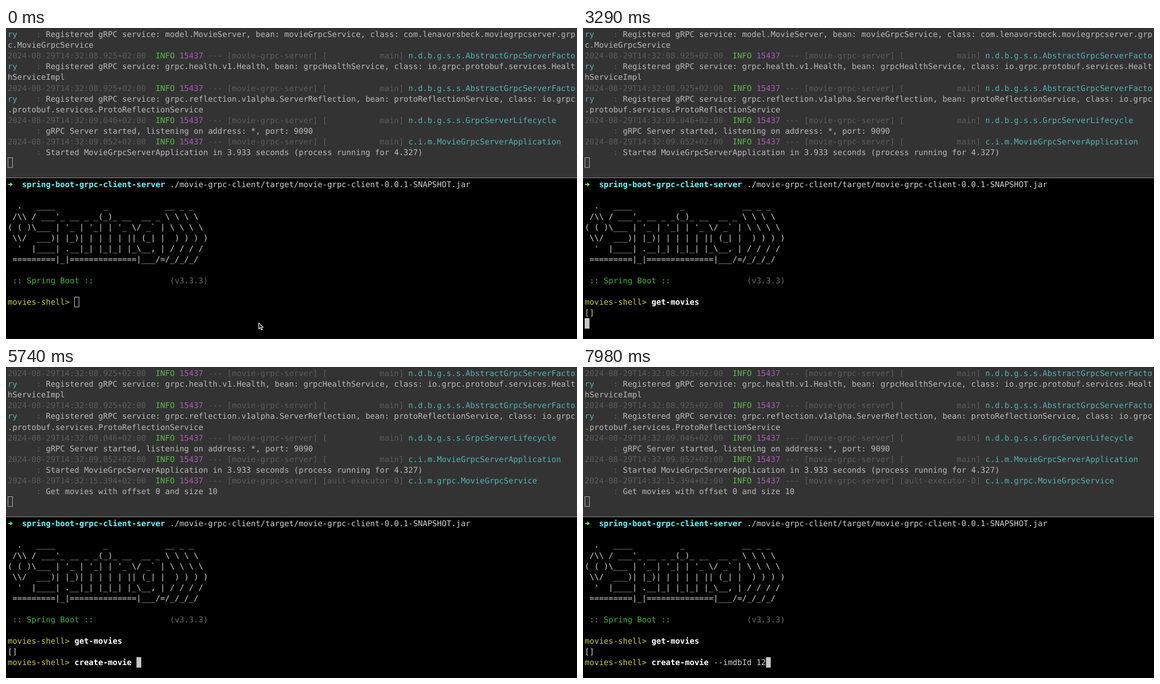
Recreate the animation shown at these times as an HTML page with a canvas. Size 1013 by 553 pixels, loop 8000 ms.

```html
<!DOCTYPE html>
<html lang="en">
<head>
<meta charset="utf-8">
<title>movies-shell</title>
<style>
  html, body { margin: 0; width: 100%; height: 100%; overflow: hidden; background: #000; }
  canvas { display: block; }
</style>
</head>
<body>
<canvas id="term" width="1013" height="553"></canvas>
<script>
const ctx = document.getElementById('term').getContext('2d');
const LOOP = 8000;
const LEFT = 3, CELL = 8.462, LINE = 19.04, BASE = 14.3;
const TOP = 2, BOTTOM = 268.5, SPLIT = 266;
const FONT = '14.055px "DejaVu Sans Mono", monospace';

const C = {
  pane: '#333333', split: '#8c8c8c',
  dim: '#5c5c5c', log: '#bababa', info: '#5fb94c', pid: '#a95fb0', cls: '#55b3b5',
  text: '#d2d2d2', bold: '#ffffff', prompt: '#cbca3e', green: '#3cb53c', faint: '#6a6a6a',
  host: '#66fbfd', arrow: '#5ff468', typed: '#7c4412', cyan: '#22b5b8', cursor: '#c9c9c9'
};

const xAt = col => LEFT + col * CELL;

function put(origin, row, col, str, color, bold) {
  ctx.font = (bold ? 'bold ' : '') + FONT;
  ctx.fillStyle = color;
  const y = origin + row * LINE + BASE;
  for (const ch of str) {
    if (ch !== ' ') ctx.fillText(ch, xAt(col), y);
    col++;
  }
  return col;
}

function block(origin, row, col, cells = 1) {
  ctx.fillStyle = C.cursor;
  ctx.fillRect(xAt(col), origin + row * LINE, cells * CELL, LINE - 0.5);
}

function hollow(origin, row, col, color) {
  ctx.strokeStyle = color;
  ctx.lineWidth = 1;
  ctx.strokeRect(Math.round(xAt(col)) + 0.5, Math.round(origin + row * LINE) + 0.5, 8, 17.5);
}

// Upper pane: each line is a list of [column, text, color]
const head = (time, thread, cls) => [
  [0, `2024-08-29T14:32:${time}+02:00`, C.dim],
  [31, 'INFO', C.info],
  [36, '15437', C.pid],
  [42, `--- [movie-grpc-server] [${thread.padStart(15)}]`, C.dim],
  [84, cls, C.cls]
];
const body = (str, wrap = '') => [[0, wrap, C.cls], [6, ':', C.dim], [8, str, C.log]];
const rest = str => [[0, str, C.log]];
const FACTORY = 'n.d.b.g.s.s.AbstractGrpcServerFacto';

const logs = [
  body('Registered gRPC service: model.MovieServer, bean: movieGrpcService, class: com.lenavorsbeck.moviegrpcserver.grp', 'ry'),
  rest('c.MovieGrpcService'),
  head('08.925', 'main', FACTORY),
  body('Registered gRPC service: grpc.health.v1.Health, bean: grpcHealthService, class: io.grpc.protobuf.services.Healt', 'ry'),
  rest('hServiceImpl'),
  head('08.925', 'main', FACTORY),
  body('Registered gRPC service: grpc.reflection.v1alpha.ServerReflection, bean: protoReflectionService, class: io.grpc', 'ry'),
  rest('.protobuf.services.ProtoReflectionService'),
  head('09.046', 'main', 'n.d.b.g.s.s.GrpcServerLifecycle'),
  body('gRPC Server started, listening on address: *, port: 9090'),
  head('09.052', 'main', 'c.i.m.MovieGrpcServerApplication'),
  body('Started MovieGrpcServerApplication in 3.933 seconds (process running for 4.327)'),
  head('15.394', 'ault-executor-0', 'c.i.m.grpc.MovieGrpcService'),
  body('Get movies with offset 0 and size 10')
];

const banner = String.raw`
  .   ____          _            __ _ _
 /\\ / ___'_ __ _ _(_)_ __  __ _ \ \ \ \
( ( )\___ | '_ | '_| | '_ \/ _${'`'} | \ \ \ \
 \\/  ___)| |_)| | | | | || (_| |  ) ) ) )
  '  |____| .__|_| |_|_| |_\__, | / / / /
 =========|_|==============|___/=/_/_/_/`.split('\n').slice(1);

const options = ['--genre', '--help', '--imdbId', '--title', '--year', '-h'];

// [time, text typed so far]
const first = [[0, ''], [770, 'g'], [910, 'ge'], [1050, 'get'], [1260, 'get-'], [1470, 'get-m'],
  [1680, 'get-mo'], [1890, 'get-mov'], [2100, 'get-movi'], [2380, 'get-movie'], [2520, 'get-movies']];
const second = [[3360, ''], [4480, 'c'], [4690, 'cr'], [4830, 'cre'], [5040, 'create-movie '],
  [6230, 'create-movie -'], [6440, 'create-movie --genre'], [6650, 'create-movie --help'],
  [7000, 'create-movie --imdbId'], [7350, 'create-movie --imdbId '],
  [7840, 'create-movie --imdbId 1'], [7980, 'create-movie --imdbId 12']];
const FOCUS = 210, ENTER = 2660, REPLY = 3290, SCROLL = 3360, MENU = 6230, ACCEPT = 7350;

const current = (keys, t) => keys.reduce((s, [at, str]) => t >= at ? str : s, '');

function promptLine(row, input, command) {
  put(BOTTOM, row, 0, 'movies-shell>', C.prompt);
  if (!input.startsWith(command)) return put(BOTTOM, row, 14, input, C.typed);
  const end = put(BOTTOM, row, 14, command, C.bold, true);
  return put(BOTTOM, row, end, input.slice(command.length), C.text);
}

function drawMenu(input) {
  const chosen = input.split(' ')[1];
  options.forEach((name, i) => {
    const col = i * 11;
    if (name === chosen) {
      block(BOTTOM, 14, col, 8);
      put(BOTTOM, 14, col, name, '#000');
    } else {
      put(BOTTOM, 14, col, '-', C.cyan);
      put(BOTTOM, 14, col + 1, name.slice(1), C.text);
    }
  });
}

function drawPath(points) {
  ctx.beginPath();
  points.forEach(([x, y]) => ctx.lineTo(x, y));
  ctx.closePath();
}

function drawArrow() {
  ctx.fillStyle = C.arrow;
  ctx.fillRect(4, 277.2, 5, 2);
  drawPath([[7.5, 274.6], [12, 278.2], [7.5, 281.8]]);
  ctx.fill();
}

function drawPointer(t) {
  const p = Math.floor(t / 70) / 5;
  if (p >= 1) return;
  ctx.save();
  ctx.translate(448.5 + 6 * p, 524.5 + 34 * p * p);
  drawPath([[0, 0], [0, 10.6], [2.5, 8.4], [4.2, 12.2], [6, 11.4], [4.4, 7.7], [7.6, 7.5]]);
  ctx.fillStyle = '#000';
  ctx.strokeStyle = '#fff';
  ctx.lineWidth = 1.1;
  ctx.fill();
  ctx.stroke();
  ctx.restore();
}

function drawServer(t) {
  ctx.fillStyle = C.pane;
  ctx.fillRect(0, 0, 1013, SPLIT);
  ctx.fillStyle = C.split;
  ctx.fillRect(0, SPLIT, 1013, 1);
  const from = t >= SCROLL ? 2 : 0;
  logs.slice(from, from + 12).forEach((line, row) => {
    for (const [col, str, color] of line) put(TOP, row, col, str, color);
  });
  hollow(TOP, 12, 0, '#adadad');
}

function drawClient(t) {
  drawArrow();
  put(BOTTOM, 0, 3, 'spring-boot-grpc-client-server', C.host, true);
  put(BOTTOM, 0, 34, './movie-grpc-client/target/movie-grpc-client-0.0.1-SNAPSHOT.jar', C.text);
  banner.forEach((line, i) => put(BOTTOM, 2 + i, 0, line, C.text));
  put(BOTTOM, 9, 1, ':: Spring Boot ::', C.green);
  put(BOTTOM, 9, 34, '(v3.3.3)', C.faint);

  let row = 11;
  let col = promptLine(row, current(first, t), 'get-movies');
  if (t >= ENTER) { row = 12; col = 0; }
  if (t >= REPLY) { put(BOTTOM, 12, 0, '[]', C.text); row = 13; }
  if (t >= SCROLL) {
    const input = current(second, t);
    col = promptLine(row, input, 'create-movie');
    if (t >= MENU && t < ACCEPT) drawMenu(input);
  }
  if (t < FOCUS) hollow(BOTTOM, row, col, '#c4c4c4');
  else block(BOTTOM, row, col);
}

function draw(t) {
  ctx.fillStyle = '#000';
  ctx.fillRect(0, 0, 1013, 553);
  drawServer(t);
  drawClient(t);
  drawPointer(t);
}

ctx.textBaseline = 'alphabetic';
ctx.textRendering = 'geometricPrecision';
const start = performance.now();
function tick() {
  draw((performance.now() - start) % LOOP);
  requestAnimationFrame(tick);
}
tick();
</script>
</body>
</html>
```
